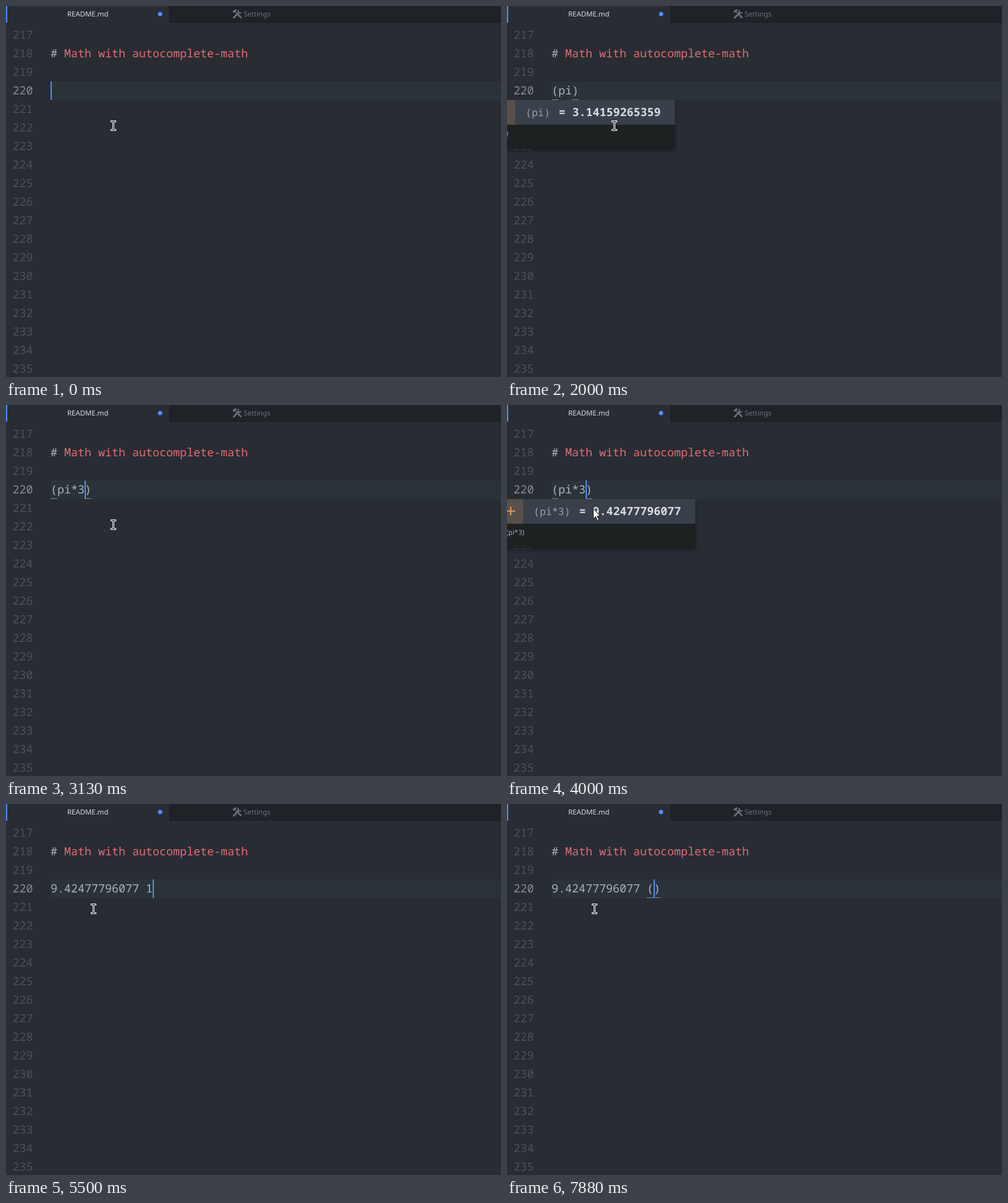
These frames come from a looping animation (800x600 px, 8000 ms). An HTML page:

```html
<!DOCTYPE html>
<html lang="en">
<head>
<meta charset="utf-8">
<title>Editor with math completion</title>
<style>
  html, body { margin: 0; height: 100%; overflow: hidden; background: #282c33; }
  svg { display: block; width: 100%; height: 100%; }
  text { white-space: pre; text-rendering: geometricPrecision; }
  .code { font: 18.333px "Noto Sans Mono", monospace; fill: #abb2bf; }
  .word { font-size: 16.5px; fill: #979eaa; }
  .value { font-weight: 700; fill: #d7dae0; }
  .ui { font: 11.4px "Noto Sans", "Open Sans", sans-serif; }
</style>
</head>
<body>
<svg viewBox="0 0 800 600">
  <defs>
    <filter id="shadow" x="-10%" y="-10%" width="120%" height="130%">
      <feDropShadow dx="0" dy="2" stdDeviation="2.5" flood-color="#000" flood-opacity=".35"/>
    </filter>
    <path id="beam" d="M-3 -7h6M0 -7v14M-3 7h6" fill="none" stroke-linecap="square"/>
  </defs>

  <!-- tabs -->
  <path d="M264 0h536v27h-536z" fill="#1f2328"/>
  <path d="M264.5 0v27M528.5 0v27M264 26.5h536" stroke="#191c20"/>
  <path d="M0 0h2v27h-2z" fill="#528bff"/>
  <circle cx="249" cy="13" r="3.5" fill="#528bff"/>
  <text class="ui" x="99" y="17" fill="#d7dae0">README.md</text>
  <text class="ui" x="384" y="17" fill="#6b727d">Settings</text>
  <g fill="none" stroke="#6b727d">
    <path d="M367 10l5-4" stroke-width="3"/>
    <path d="M370 9l4 4" stroke-width="1.5"/>
    <path d="M375.5 14.5l4 4M368 19l7.5-8" stroke-width="2.6" stroke-linecap="round"/>
    <path d="M376 6.5a2.8 2.8 0 1 0 4 4" stroke-width="2"/>
  </g>

  <!-- editor -->
  <path d="M72 122h728v30h-728z" fill="#2b3339"/>
  <g id="gutter"></g>
  <text class="code" x="72" y="83"># <tspan fill="#e06c75">Math with autocomplete-math</tspan></text>
  <g id="line"></g>
  <g id="popup"></g>
  <g id="mouse"></g>
</svg>
<script>
const LOOP = 8000, LEFT = 72, CHAR = 11, BASE = 143;
const $ = id => document.getElementById(id);
const PI3 = '9.42477796077';

// time, text, caret column (-1 while blinked off)
const typing = [
  [0, '', 0], [130, '', -1], [250, '(', -1], [380, '()', 1], [630, '()', -1],
  [880, '(p', -1], [1000, '(p)', 2], [1130, '(pi', -1], [1250, '(pi)', -1],
  [1630, '(pi)', 3], [2000, '(pi)', -1], [2250, '(pi*)', 4], [2500, '(pi*)', -1],
  [2750, '(pi*)', 4], [3000, '(pi*3', -1], [3130, '(pi*3)', 5],
  [3500, '(pi*3)', -1], [3880, '(pi*3)', 5],
  [4250, PI3, 13], [4500, PI3, -1], [4750, PI3, 13], [4880, PI3 + ' ', 14],
  [5130, PI3 + ' ', -1], [5380, PI3 + ' 1', -1], [5500, PI3 + ' 1', 15],
  [5750, PI3 + ' 1+', -1], [5880, PI3 + ' 1+', 16], [6130, PI3 + ' 1+', -1],
  [6380, PI3 + ' 1+', 16], [6630, PI3 + ' 1', 15], [6750, PI3 + ' ', 14],
  [7130, PI3 + ' ', -1], [7380, PI3 + ' ()', 15], [7630, PI3 + ' ()', -1],
  [7880, PI3 + ' ()', 15]
];

// time, popup shift, expression, result
const popups = [
  [0], [1380, -13, '(pi)', '3.14159265359'], [2250],
  [3250, 0, '(pi*3)', PI3], [4250]
];

// time, pointer shape, x, y
const pointer = [
  [0, 'beam', 173.5, 193.5], [3500, 'arrow', 167, 189], [3630, 'arrow', 160, 184],
  [3750, 'arrow', 150, 176], [3880, 'arrow', 143, 170], [4000, 'arrow', 139.5, 168],
  [4250, 'beam', 141.5, 169.5]
];

const shapes = {
  beam: '<use href="#beam" stroke="#fff" stroke-width="3"/><use href="#beam" stroke="#14171b"/>',
  arrow: '<path d="M0 0v16l3.7-3.6 2.8 6.3 2.4-1-2.8-6.2h5.1z" fill="#fff" stroke="#111" stroke-width=".9"/>'
};

const at = (steps, t) => steps.findLast(step => step[0] <= t);
const code = (x, y, s, extra = '') => `<text class="code ${extra}" x="${x}" y="${y}">${s}</text>`;

function lineMarkup([, text, caret]) {
  let out = code(LEFT, BASE, text);
  [...text].forEach((c, i) => {
    if ('()'.includes(c)) out += `<path d="M${LEFT + i * CHAR} 151.5h${CHAR}" stroke="#858e9b"/>`;
  });
  if (caret >= 0) out += `<path d="M${LEFT + caret * CHAR} 122h2v30h-2z" fill="#528bff"/>`;
  return out;
}

function popupMarkup([, shift, expr, result]) {
  if (!expr) return '';
  const valueX = 43 + expr.length * 9.9 + 14;
  const right = valueX + 15 * CHAR + 23;
  return `<g transform="translate(${shift})">
    <path d="M-20 152H${right}V232H-20z" fill="#1c2024" filter="url(#shadow)"/>
    <path d="M-20 152H${right}V192H-20z" fill="#3a404a"/>
    <path d="M-20 152H26V192H-20z" fill="#594f4b"/>
    <path d="M-1 171.5h14M6 164.5v14" stroke="#d8a163" stroke-width="2"/>
    ${code(43, 178, expr, 'word')}${code(valueX, 178, '= ' + result, 'value')}
    <text class="ui" x="-1.5" y="210" fill="#a0a7b2">${expr}</text></g>`;
}

const pointerMarkup = ([, shape, x, y]) =>
  `<g transform="translate(${x} ${y})">${shapes[shape]}</g>`;

for (let n = 217; n <= 235; n++) {
  const style = n === 220 ? 'fill:#858c98;font-weight:500' : 'fill:#4a515e';
  $('gutter').innerHTML +=
    `<text class="code" x="10.5" y="${BASE + (n - 220) * 30}" style="${style}">${n}</text>`;
}

const layers = [
  ['line', typing, lineMarkup], ['popup', popups, popupMarkup], ['mouse', pointer, pointerMarkup]
];
const shown = {};

function draw(now) {
  const t = now % LOOP;
  for (const [id, steps, markup] of layers) {
    const step = at(steps, t);
    if (shown[id] === step) continue;
    shown[id] = step;
    $(id).innerHTML = markup(step);
  }
}

const start = performance.now();
function tick() {
  draw(performance.now() - start);
  requestAnimationFrame(tick);
}
tick();
</script>
</body>
</html>
```
